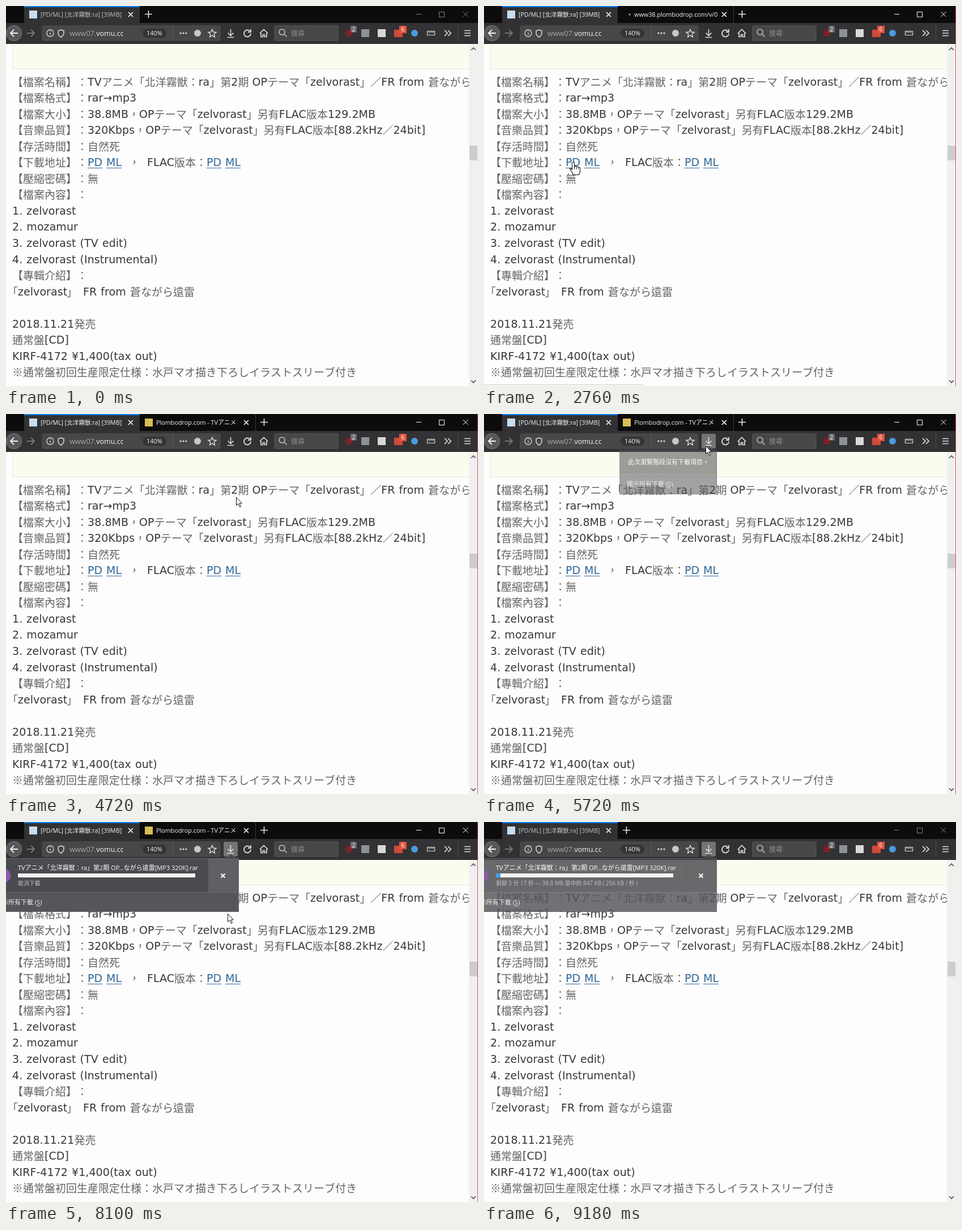
Recreate the animation shown at these times as an HTML page with a canvas. Size 833x672 px, loop 9220 ms.

```html
<!DOCTYPE html>
<html lang="zh-Hant">
<head>
<meta charset="utf-8">
<style>
html, body { margin: 0; width: 100%; height: 100%; overflow: hidden; background: #fdfdfd; }
canvas { display: block; }
</style>
</head>
<body>
<canvas id="stage" width="833" height="672"></canvas>
<script>
const ctx = document.getElementById('stage').getContext('2d');
const LOOP = 9220;
const UI = '"Open Sans", sans-serif', PAGE = '"DejaVu Sans", sans-serif';
const CJK = '"Noto Sans CJK TC", "Noto Sans CJK JP", sans-serif';
const RUNS = /[\u3000-\u30ff\u4e00-\u9fff\uff00-\uffef※]|[^\u3000-\u30ff\u4e00-\u9fff\uff00-\uffef※]+/g;
const SONG = 'zelvorast', BAND = 'FR from 蒼ながら';

const clamp = v => Math.max(0, Math.min(1, v));
const ease = v => (v = clamp(v), v * v * (3 - 2 * v));
const mix = (a, b, k) => a + (b - a) * k;

function rect(x, y, w, h, color) {
  ctx.fillStyle = color;
  ctx.fillRect(x, y, w, h);
}
function round(x, y, w, h, r, color, border) {
  ctx.beginPath();
  ctx.roundRect(x, y, w, h, r);
  if (color) { ctx.fillStyle = color; ctx.fill(); }
  if (border) { ctx.strokeStyle = border; ctx.lineWidth = 1; ctx.stroke(); }
}
function dot(x, y, r, color) {
  ctx.beginPath();
  ctx.arc(x, y, r, 0, 7);
  ctx.fillStyle = color;
  ctx.fill();
}
function line(d, color, width = 1.5, fill) {
  const p = new Path2D(d);
  if (fill) { ctx.fillStyle = fill; ctx.fill(p); }
  ctx.strokeStyle = color;
  ctx.lineWidth = width;
  ctx.stroke(p);
}
function clipped(x, y, w, h, draw) {
  ctx.save();
  ctx.beginPath();
  ctx.rect(x, y, w, h);
  ctx.clip();
  draw();
  ctx.restore();
}
function faded(alpha, draw) {
  ctx.save();
  ctx.globalAlpha = alpha;
  draw();
  ctx.restore();
}

// Draws mixed text with full-width CJK cells; returns the end position.
function text(s, x, y, size, color, family = UI) {
  const page = family === PAGE, alpha = ctx.globalAlpha;
  ctx.fillStyle = color;
  for (const run of s.match(RUNS)) {
    const wide = /[\u3000-\uffef※]/.test(run[0]), thin = page && wide;
    ctx.font = wide ? `${page ? 300 : 400} ${size}px ${CJK}` : `${size}px ${family}`;
    ctx.letterSpacing = page && !wide ? '0.06px' : '0px';
    ctx.wordSpacing = page && !wide ? '1px' : '0px';
    ctx.globalAlpha = thin ? alpha * 0.78 : alpha;
    ctx.fillText(run, x, thin ? y + 1 : y);
    x += wide ? size : ctx.measureText(run).width;
  }
  ctx.globalAlpha = alpha;
  return x;
}

const rows = [
  `【檔案名稱】：TVアニメ「北洋霧獣：ra」第2期 OPテーマ「${SONG}」／${BAND}`,
  '【檔案格式】：rar→mp3',
  `【檔案大小】：38.8MB，OPテーマ「${SONG}」另有FLAC版本129.2MB`,
  `【音樂品質】：320Kbps，OPテーマ「${SONG}」另有FLAC版本[88.2kHz／24bit]`,
  '【存活時間】：自然死', '【下載地址】：', '【壓縮密碼】：無', '【檔案內容】：',
  `1. ${SONG}`, '2. mozamur', `3. ${SONG} (TV edit)`, `4. ${SONG} (Instrumental)`,
  '【專輯介紹】：', '', '', '2018.11.21発売', '通常盤[CD]',
  'KIRF-4172 ¥1,400(tax out)',
  '※通常盤初回生産限定仕様：水戸マオ描き下ろしイラストスリーブ付き'
];

function drawPage() {
  rect(0, 67, 833, 605, '#fdfdfd');
  rect(11, 67, 807, 45, '#e9e8dc');
  rect(12, 67, 806, 44, '#fcfbf0');
  const base = i => Math.round(140.5 + i * 28.55), ink = '#383838';
  const put = (s, x, i, color = ink) => text(s, x, base(i), 19, color, PAGE);
  clipped(0, 67, 817, 605, () => {
    rows.forEach((s, i) => s && put(s, 11, i));
    for (const [s, x] of [['PD', 144], ['ML', 177], ['PD', 354], ['ML', 387]]) {
      const end = put(s, x, 5, '#336699');
      rect(x, base(5) + 3, end - x, 1, '#336699');
    }
    put('，', 217, 5);
    put('FLAC版本：', 249, 5);
    put('「', 2, 13);
    put(SONG, 21, 13);
    put('」', 107, 13);
    put(BAND + '遠雷', 136, 13);
  });
  rect(817, 67, 16, 605, '#f0f0f0');
  rect(818, 247, 14, 26, '#cdcdcd');
  line('M821 78l4-4 4 4M821 662l4 4 4-4', '#505050', 1.6);
}

function drawTabs(t, active) {
  const ink = active ? '#f5f5f7' : '#c4c4c6', dim = active ? '#fff' : '#858587';
  const open = t < 8850 ? ease((t - 2140) / 200) : 0;
  const w = 204 * open;
  rect(0, 0, 833, 30, '#0c0c0d');
  rect(32, 0, 204, 30, '#323234');
  rect(32, 0, 204, 2, '#0a84ff');
  rect(41, 8, 14, 14, '#c9dcf0');
  clipped(61, 2, 146, 28, () => text('[PD/ML] [北洋霧獣:ra] [39MB]', 61, 19, 10.6, ink));
  line('M216 11l8 8M224 11l-8 8', '#fff', 1.6);

  clipped(236, 0, w + 1, 30, () => {
    const loaded = t >= 3900;
    const burst = Math.max(t > 3900 ? 1 - (t - 3900) / 800 : 0, t > 6500 ? 1 - (t - 6500) / 460 : 0);
    if (burst > 0) {
      const g = ctx.createRadialGradient(252, 15, 0, 252, 15, 45);
      g.addColorStop(0, `rgba(10,90,180,${0.6 * burst})`);
      g.addColorStop(1, 'rgba(10,90,180,0)');
      rect(236, 0, 90, 30, g);
    }
    if (loaded) rect(245, 8, 14, 14, '#d9bd55');
    else dot(252 + 5 * Math.cos((t - 2760) / 140), 15, 1.7, '#9a9a9e');
    clipped(265, 0, 147, 30, () =>
      text(loaded ? 'Plombodrop.com - TVアニメ「' : 'www38.plombodrop.com/v/0M', 265, 19, 10.8, ink));
    line('M420 11l8 8M428 11l-8 8', '#fff', 1.6);
    rect(440, 0, 1, 30, '#3a3a3c');
  });
  ctx.save();
  ctx.translate(w, 0);
  line('M245 14.5h13M251.5 8v13', '#e8e8ea', 1.6);
  ctx.restore();
  line('M724 14.5h9M764.5 10.5h9v9h-9zM806.5 10l9 9M815.5 10l-9 9', dim, 1);
}

function drawToolbar(t) {
  const ink = '#dededf';
  rect(0, 30, 833, 37, '#323234');
  rect(0, 66, 833, 1, '#19191b');
  dot(14, 48, 14, '#77777a');
  dot(14, 48, 13, '#58585b');
  line('M21 48H8M14 42l-6 6 6 6', '#f4f4f4', 1.8);
  line('M37 48h13M44 42l6 6-6 6', '#777779', 1.8);

  round(64, 35, 314, 26, 2, '#474749', '#505052');
  line('M84 48a6 6 0 1 1-12 0a6 6 0 1 1 12 0M78 47v4M78 44.2v1.4', ink, 1.3);
  line('M97 42l5 2v4q0 4-5 7q-5-3-5-7v-4z', ink, 1.5);
  clipped(112, 35, 95, 26, () => {
    const x = text('www07.', 112, 52.5, 12.6, '#a4a4a6');
    text('vomu.com', x, 52.5, 12.6, '#f5f5f5');
  });
  round(241, 40, 42, 16, 8, '#343436');
  text('140%', 248, 52, 11, '#f0f0f0');
  rect(294, 38, 1, 20, '#5c5c5e');
  for (const x of [308, 313, 318]) dot(x, 48, 1.6, ink);
  dot(338, 48, 6, '#c9c9cb');
  line('M364 41.5l2 4.5 5 .5-3.8 3.3 1.2 5-4.4-2.7-4.4 2.7 1.2-5-3.8-3.3 5-.5z', ink, 1.4);

  if (t >= 4900) round(384, 35, 25, 26, 2, t < 5590 ? '#59595c' : '#747477');
  line('M396.5 41v11M391.5 47.5l5 5 5-5M390.5 55.5h12', ink, 1.6);
  line('M430.5 44.5a6 6 0 1 0 1.5 4M432 41v5h-5', ink, 1.8);
  line('M448 48.5l7-7 7 7M450 48v6.5h3.5v-4h3v4h3.5V48', ink, 1.7);

  round(474, 35, 112, 26, 2, '#474749', '#5a5a5c');
  line('M492 46a5 5 0 1 1-10 0a5 5 0 1 1 10 0M490.5 49.5l5 5', '#b6b6b8', 1.7);
  text('搜尋', 503, 53, 12, '#8f8f92');

  dot(605, 48, 6.5, '#7d1f26');
  rect(627, 41, 14, 14, '#8b9296');
  rect(656, 41, 14, 14, '#d8d8d8');
  rect(685, 42, 15, 13, '#cf4a3c');
  dot(721, 48, 6, '#4a9be0');
  round(608, 35, 11, 12, 1, '#6c6c70');
  text('2', 610.5, 45, 10, '#fff');
  round(694, 35, 13, 13, 1, '#e0543c');
  text('6', 697.5, 45, 10, '#fff');
  line('M743.5 44.5h13v7h-13zM746.5 45v3M750 45v3M753.5 45v3', ink, 1.2);
  line('M774 43l5 5-5 5M780 43l5 5-5 5', ink, 1.7);
  rect(797, 33, 1, 30, '#505053');
  line('M809 43.5h11M809 48h11M809 52.5h11', ink, 1.7);
}

function footer(x, y) {
  const a = text('顯示所有下載 (', x, y, 11, '#efeff0');
  const b = text('S', a, y, 11, '#efeff0');
  rect(a, y + 2, b - a, 1, '#efeff0');
  text(')', b, y, 11, '#efeff0');
}

// Parts do not overlap, so the panel fades evenly.
function panelBox(x, bottom, split) {
  line('M388 64l8.500-7 8.500 7', '#5c5c60', 1, '#4a4a4f');
  rect(x, 64, 411 - x, split - 64, '#4a4a4f');
  rect(x, split, 411 - x, 1, '#68686c');
  rect(x, split + 1, 411 - x, bottom - split - 1, '#55555a');
  line(`M${x - .5} 64.5H388M405 64.5h5.500V${bottom - .5}H${x - .5}`, '#66666a', 1);
}

function drawEmptyPanel(t) {
  const shown = ease((t - 5610) / 210);
  faded(shown, () => panelBox(239, 142, 106));
  faded(Math.min(1, shown * 1.8), () => {
    text('此次瀏覽階段沒有下載項目。', 254, 89, 11, '#fff');
    footer(252, 128);
  });
}

function drawProgress(t, done) {
  if (t < 6800) {
    const g = ctx.createLinearGradient(21, 0, 334, 0), c = ((t - 6610) / 900 + 1.5) % 1;
    g.addColorStop(0, '#3d94e6');
    g.addColorStop(c, '#8cc4f6');
    g.addColorStop(1, '#3d94e6');
    rect(21, 91, 313, 7, g);
  } else {
    rect(21, 91, 313, 7, '#f4f4f5');
    if (done) rect(21, 91, 8, 7, '#4a9fe8');
  }
}

function drawDownload(t) {
  const hover = t >= 7950 && t < 8130, done = t >= 8500;
  const status = hover ? '取消下載'
    : t < 7500 ? '剩餘時間未知 — 0 位元組 ( 0 位元組 / 秒 )'
    : done ? '剩餘 3 分 17 秒 — 38.8 MB 當中的 847 KB ( 256 KB / 秒 )'
    : '剩餘 4 分 26 秒 — 38.8 MB 當中的 125 KB ( 142 KB / 秒 )';
  const shown = mix(1, 0.82, clamp((t - 9090) / 90));
  faded(shown, () => {
    panelBox(0, 159, 124);
    if (hover) rect(357, 65, 53, 59, '#606064');
    else rect(357, 74, 1, 41, '#606064');
    if (t >= 6800) dot(-5, 95, 13, '#8d5aa8');
  });
  text('TVアニメ「北洋霧獣：ra」第2期 OP...ながら遠雷[MP3 320K].rar', 21, 85, 11, '#fff');
  drawProgress(t, done);
  text(status, 21, 112, 9.9, '#c0c0c3');
  line('M379.5 91.5l7 7M386.5 91.5l-7 7', '#fff', 2);
  footer(-18, 146);
}

// time, x, y of the pointer tip
const route = [
  [410, 732, 610], [1310, 176, 277], [1550, 157, 276], [2900, 157, 276],
  [3400, 730, 652], [3840, 475, 316], [4720, 406, 147], [4760, 399, 121],
  [4920, 391, 56], [7900, 391, 56], [8100, 391, 162], [8720, 751, 672]
];

function drawPointer(t) {
  const i = route.findIndex(p => p[0] > t);
  if (i < 1) return;
  const [t0, x0, y0] = route[i - 1], [t1, x1, y1] = route[i];
  const k = ease((t - t0) / (t1 - t0));
  const x = mix(x0, x1, k), y = mix(y0, y1, k);
  const onLink = x > 143 && x < 170 && y > 265 && y < 288;
  ctx.save();
  ctx.translate(Math.round(x) + .5, Math.round(y) + .5);
  ctx.lineJoin = 'round';
  if (onLink) {
    line('M-2 1q2-3 4 0v7l1-1q2-1 3 1q2-1 3 1q2-1 3 1v7l-2 5H-1v-3l-5-7q0-3 4 1z', '#111', 1.1, '#fff');
    line('M2 8v4M6 9v3M9 10v2', '#111', 1);
  } else {
    line('M0 0v14l3-3 3 6 2-1-2.6-5.5H10z', '#111', 1, '#fff');
  }
  ctx.restore();
}

function frame(now) {
  const t = now % LOOP, active = t >= 2100 && t < 9090;
  drawPage();
  drawTabs(t, active);
  drawToolbar(t);
  if (t >= 1820 && t < 3100) {
    rect(0, 669, 280, 3, '#f5f5f5');
    line('M0 669.5h280.5v3', '#d2d2d2', 1);
  }
  if (t >= 5590 && t < 6520) drawEmptyPanel(t);
  if (t >= 6520) drawDownload(t);
  drawPointer(t);
  if (active) rect(832, 0, 1, 672, '#e2485c');
  requestAnimationFrame(frame);
}
requestAnimationFrame(frame);
</script>
</body>
</html>
```
